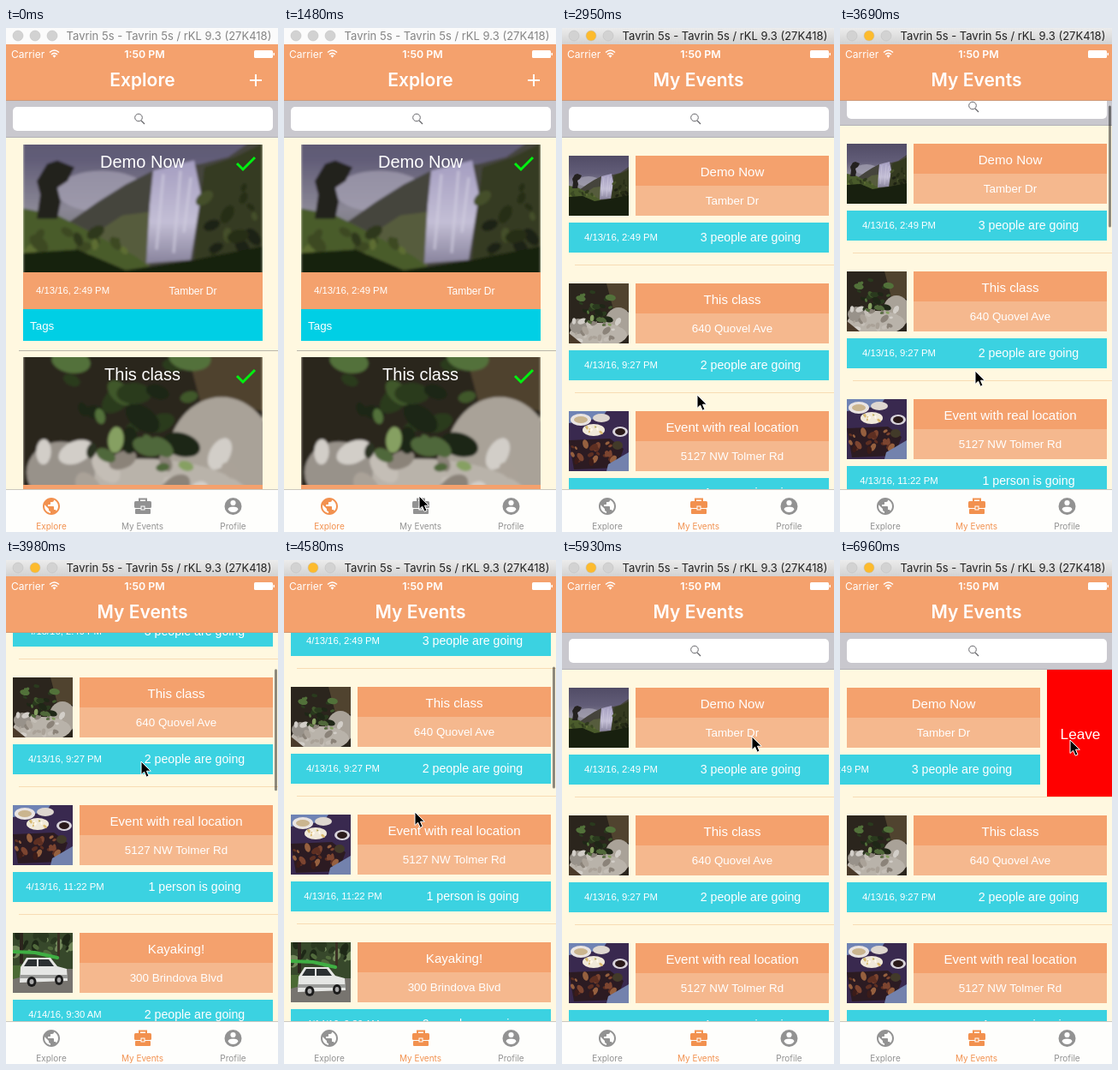
These frames come from a looping animation (318x588 px, 8 s). An HTML page:

```html
<!DOCTYPE html>
<html lang="en">
<head>
<meta charset="utf-8">
<title>Event list</title>
<style>
  html, body { margin: 0; width: 100%; height: 100%; overflow: hidden; background: #fff8e0; }
  svg { display: block; width: 100vw; height: 100vh; }
  text { font-family: "Liberation Sans", Arial, sans-serif; fill: #fff; white-space: pre; }
  .ui { font-family: Inter, "Open Sans", sans-serif; }
  .mid { text-anchor: middle; }
  .tab { color: #929292; }
  .tab.on { color: #f2914f; }
  .tab text { fill: currentColor; font-size: 10px; }
</style>
</head>
<body>
<svg id="stage" viewBox="0 0 318 588"></svg>
<script>
const LOOP = 8000;
const ORANGE = '#f4a16d', CREAM = '#fff8e0';

const rect = (x, y, w, h, fill, extra = '') =>
  `<rect x="${x}" y="${y}" width="${w}" height="${h}" fill="${fill}" ${extra}/>`;
const label = (x, y, size, str, cls = 'mid', extra = '') =>
  `<text x="${x}" y="${y}" font-size="${size}" class="${cls}" ${extra}>${str}</text>`;
const shape = (d, fill, extra = '') => `<path d="${d}" fill="${fill}" ${extra}/>`;
const line = (d, color, width, extra = '') =>
  shape(d, 'none', `stroke="${color}" stroke-width="${width}" ${extra}`);
const oval = (x, y, rx, ry, fill, extra = '') =>
  `<ellipse cx="${x}" cy="${y}" rx="${rx}" ry="${ry}" fill="${fill}" ${extra}/>`;
const group = (id, body, extra = '') => `<g id="${id}" ${extra}>${body}</g>`;
const gradient = (id, ...stops) =>
  `<linearGradient id="${id}" x2="0" y2="1">${stops.map(([o, c]) =>
    `<stop offset="${o}" stop-color="${c}"/>`).join('')}</linearGradient>`;

function randomizer(seed) {
  return () => (seed = seed * 16807 % 2147483647) / 2147483647;
}

// Scatter of soft blobs inside a box
function blobs(seed, count, [x, y, w, h], size, colors) {
  const rnd = randomizer(seed);
  return Array.from({ length: count }, () => {
    const cx = (x + rnd() * w).toFixed(1), cy = (y + rnd() * h).toFixed(1);
    const r = size * (0.5 + rnd());
    return oval(cx, cy, r.toFixed(1), (r * 0.6).toFixed(1), colors[Math.floor(rnd() * colors.length)],
      `transform="rotate(${Math.floor(rnd() * 180)} ${cx} ${cy})"`);
  }).join('');
}

// Pictures are painted on a 70 x 70 square
const pictures = {
  falls:
    rect(0, 0, 70, 70, 'url(#sky)') +
    oval(23, 30, 13, 6, '#a5a2b4', 'opacity=".7"') +
    shape('M12 40L22 33 30 28 38 24 52 22 60 20 70 13V58H12Z', '#45443c') +
    shape('M20 43L29 37 37 36 37 52H20Z', '#565c3d') +
    shape('M38 24L50 21 52 31 49 50 36 51 37 34Z', 'url(#water)') +
    line('M41 25L39 47M46 24L44 48M49 26L47 42', '#d3cfe2', 0.8, 'opacity=".6"') +
    shape('M53 23L62 20 70 16V58H49L51 40Z', '#343a20') +
    shape('M0 35L10 37 20 42 33 49 42 56H0Z', '#4a5b2b') +
    blobs(5, 16, [2, 40, 30, 12], 2.2, ['#5d6d33', '#3c4a24', '#2f391d']) +
    blobs(9, 14, [53, 28, 15, 22], 2.2, ['#45502a', '#262d16', '#1e2214']) +
    shape('M4 38L5 31 4 27 7 22 10 21 15 23 13 27 10 29 11 33 10 38Z', '#24211f') +
    shape('M0 48L16 47 30 53 50 50 70 46V70H0Z', '#18200f'),
  dish:
    rect(0, 0, 70, 70, '#2b251d') +
    shape('M44 0H70V32L52 30Z', '#50432f') +
    oval(58, 47, 16, 19, '#a9a298') +
    oval(34, 60, 34, 14, '#b9b3aa') +
    oval(11, 50, 10, 9, '#98928a') +
    blobs(31, 24, [6, 42, 58, 26], 4, ['#d2cec8', '#c4beb6', '#8b8379', '#aaa298']) +
    blobs(17, 20, [14, 10, 36, 32], 4.2, ['#40582c', '#6c8c4c', '#2a3a1e', '#52713a', '#1f2717']) +
    blobs(3, 9, [20, 40, 28, 9], 3, ['#50683a', '#2b3320', '#86a062']) +
    shape('M0 58L0 70 15 70Z', '#4a3a2a'),
  meal:
    rect(0, 0, 70, 70, '#39294f') +
    shape('M0 0H44L38 8 0 14Z', '#6f83b4') +
    oval(14, 10, 12, 7, '#e9e4e2') + oval(14, 10, 8, 4, '#cab58f') +
    oval(38, 8, 10, 5, '#ded7d0') +
    oval(60, 24, 9, 6, '#d9d4dc') + oval(60, 24, 6, 4, '#2a1a1a') +
    oval(29, 22, 13, 7, '#f0e9d9') + blobs(8, 10, [20, 18, 18, 8], 2, ['#d9b96f', '#fff8e8', '#8e9b4c']) +
    shape('M0 34L48 32 64 44 56 66 6 68Z', '#2c1b22') +
    blobs(12, 26, [4, 36, 48, 24], 4, ['#5e2f22', '#7d4530', '#3c1c19', '#96603f']) +
    oval(57, 40, 6, 5, '#423a29') + shape('M46 62L70 48V70H44Z', '#7382ad'),
  car:
    rect(0, 0, 70, 70, '#37482b') +
    blobs(21, 30, [0, 0, 70, 26], 5, ['#2a3820', '#516a3c', '#71875a', '#1e2817']) +
    rect(8, 0, 4, 36, '#2c251d') + rect(52, 0, 3, 28, '#3a3024') +
    rect(0, 42, 70, 28, '#77746f') +
    shape('M0 38H16V50L0 54Z', '#4b6a34') +
    line('M0 22L26 23 52 29', '#3fae43', 4, 'stroke-linecap="round"') +
    shape('M9 40L16 29H44L52 39 63 42 64 56 8 58Z', '#e5e6e4') +
    shape('M13 39L18 31H28V39ZM30 39V31H42L48 39Z', '#2b3032') +
    shape('M8 49H64V53H8Z', '#9b9c9a') +
    oval(22, 57, 5.5, 6, '#1b1b1b') + oval(54, 55, 5, 6, '#1b1b1b') +
    oval(22, 57, 2.5, 3, '#a8a8a8') + oval(54, 55, 2.3, 3, '#a8a8a8')
};
const picture = (name, x, y, w, h) =>
  `<svg x="${x}" y="${y}" width="${w}" height="${h}" viewBox="0 0 70 70" preserveAspectRatio="xMidYMid slice"><g filter="url(#soft)">${pictures[name]}</g></svg>`;

const events = [
  ['falls', 'Demo Now', 'Tamber Dr', '4/13/16, 2:49 PM', '3 people are going'],
  ['dish', 'This class', '640 Quovel Ave', '4/13/16, 9:27 PM', '2 people are going'],
  ['meal', 'Event with real location', '5127 NW Tolmer Rd', '4/13/16, 11:22 PM', '1 person is going'],
  ['car', 'Kayaking!', '300 Brindova Blvd', '4/14/16, 9:30 AM', '2 people are going']
];

const searchBar =
  rect(0, 85, 318, 43, '#c9c8ce') + rect(0, 127, 318, 1, '#b2b1b7') +
  rect(8, 92, 304, 28, '#fff', 'rx="5"') +
  '<circle cx="155" cy="104.500" r="4.300" fill="none" stroke="#66666b"/>' +
  line('M158 108L162 112', '#66666b', 1.3);

function eventRow([pic, title, place, date, going], i) {
  const y = 128 + 149 * i;
  const card =
    picture(pic, 8, y + 21, 70, 70) +
    rect(86, y + 21, 226, 35, ORANGE) + rect(86, y + 56, 226, 35, '#f5b88e') +
    rect(8, y + 99, 304, 35, '#3bd2e1') +
    label(199, y + 44.5, 15.1, title) + label(199, y + 78, 13.4, place) +
    label(69, y + 120, 11.3, date) + label(220.5, y + 121, 14.2, going);
  return rect(15, y + 148, 303, 1, '#f8dcb4') + group('card' + i, card);
}

function exploreCard([pic, title, place, date], y) {
  return picture(pic, 20, y, 280, 149) +
    rect(20, y + 149, 280, 43, ORANGE) + rect(20, y + 192, 280, 37, '#00cfe5') +
    label(159.5, y + 27, 20, title) +
    line(`M270 ${y + 22}L277 ${y + 29} 291 ${y + 15}`, '#00f010', 3) +
    label(35, y + 174, 11.3, date, '') + label(218.5, y + 175, 12, place) +
    label(28, y + 216, 13.4, 'Tags', '') + rect(15, y + 240, 303, 1, '#b9b6aa');
}

function spokes(inner, outer, width, color) {
  return Array.from({ length: 12 }, (_, i) =>
    line(`M0 ${-inner}V${-outer}`, color, width,
      `stroke-linecap="round" opacity="${(0.25 + 0.7 * ((i + 3) % 12) / 11).toFixed(2)}" transform="rotate(${i * 30})"`)).join('');
}

const loading =
  rect(105, 261, 110, 86, '#4c4a42', 'rx="9"') +
  `<g transform="translate(159.500 286.500)">${group('spin', spokes(9, 16, 3, '#fff'))}</g>` +
  label(160, 330, 13.4, 'Loading...') +
  `<g transform="translate(73.500 30)">${group('busy', spokes(2.5, 4.5, 1, '#fbe0cc'))}</g>`;

const header =
  rect(0, 19, 318, 65, ORANGE) + rect(0, 84, 318, 1, '#cf9a78') +
  label(6, 34.5, 12, 'Carrier', 'ui') + label(162, 34.5, 12.4, '1:50 PM', 'ui mid', 'font-weight="600"') +
  line('M51 28.500Q56.500 23.500 62 28.500M53 31Q56.500 27.800 60 31', '#fff', 1.5) +
  shape('M54.500 32.300Q56.500 30.600 58.500 32.300L56.500 34.700Z', '#fff') +
  rect(290, 26, 22, 9, '#fff', 'rx="1.500"') + rect(312.5, 29, 1.5, 3, '#fff') +
  label(159.5, 68, 21, '', 'ui mid', 'id="heading" font-weight="600"') +
  group('plus', line('M285 61H299M292 54V68', '#fff', 2));

const globe = 'M12 2C6.480 2 2 6.480 2 12s4.480 10 10 10 10-4.480 10-10S17.520 2 12 2zm-1 17.930c-3.950-.490-7-3.850-7-7.930 0-.620.080-1.210.210-1.790L9 15v1c0 1.100.900 2 2 2v1.930zm6.900-2.540c-.260-.810-1-1.390-1.900-1.390h-1v-3c0-.550-.450-1-1-1H8v-2h2c.550 0 1-.450 1-1V7h2c1.100 0 2-.900 2-2v-.410c2.930 1.190 5 4.060 5 7.410 0 2.080-.800 3.970-2.100 5.390z';
const tab = (id, x, icon, name) =>
  group(id, icon + label(x, 584.5, 10, name, 'ui mid'), 'class="tab"');
const tabBar =
  rect(0, 539, 318, 49, '#fefefc') + rect(0, 538, 318, 1, '#cbc8bf') +
  tab('tabExplore', 53, shape(globe, 'currentColor', 'transform="translate(41 546)"'), 'Explore') +
  tab('tabEvents', 159.5,
    rect(150, 552, 20, 8, 'currentColor', 'rx="1.500"') + rect(151, 561, 18, 6, 'currentColor', 'rx="1"') +
    line('M156 552V549.500H164V552', 'currentColor', 2) + rect(158, 558, 4, 4, 'currentColor', 'stroke="#fff"'),
    'My Events') +
  tab('tabProfile', 265.5,
    oval(265.5, 558, 10, 10, 'currentColor') + oval(265.5, 554, 3.1, 3.1, '#fff') +
    shape('M259.500 561.500Q260 558.800 265.500 558.600 271 558.800 271.500 561.500 269.500 565 265.500 565 261.500 565 259.500 561.500Z', '#fff'),
    'Profile');

const windowBar =
  rect(0, 0, 318, 19, '#fbfbfb', 'id="bar"') +
  [14, 34, 54].map((x, i) => oval(x, 9, 6, 6, '#d2d2d2', `id="dot${i}" stroke="#bdbdbd" stroke-width=".5"`)).join('') +
  label(190.5, 14, 13, 'Tavrin 5s - Tavrin 5s / rKL 9.3 (27K418)', 'ui mid', 'id="caption"');

document.getElementById('stage').innerHTML =
  '<defs>' +
  gradient('sky', [0, '#514c66'], [0.3, '#625d78'], [0.5, '#8a8795'], [1, '#39432c']) +
  gradient('water', [0, '#a49dc0'], [0.6, '#c3bed5'], [1, '#88839c']) +
  gradient('chrome', [0, '#ececec'], [1, '#d2d2d2']) +
  '<filter id="soft"><feGaussianBlur stdDeviation=".45"/></filter>' +
  '</defs>' +
  rect(0, 0, 318, 588, CREAM) +
  group('explore', searchBar + exploreCard(events[0], 136) + exploreCard(events[1], 384)) +
  group('list',
    group('leave', rect(0, 128, 90, 149, '#f00') + label(39, 209, 17.2, 'Leave')) +
    searchBar + events.map(eventRow).join('')) +
  rect(314, 87, 3, 142, '#000', 'id="thumb" rx="1.500" opacity=".45"') +
  header + tabBar + group('loading', loading) + windowBar +
  group('pointer', shape('M0 0V15.500L3.600 12.200 6.200 18.200 9 17 6.500 11.200H11.300Z', '#000', 'stroke="#fff" stroke-width="1"'));

// Each step: [start time, values...]; values hold until the next step
const pointerSteps = [
  [450, 305, 347], [600, 262, 395], [740, 218, 450], [890, 186, 500], [1040, 166, 525], [1190, 158, 536],
  [1480, 158, 546], [1630, 158, 562], [2800, 158, 500], [2950, 158, 428],
  [3690, 158, 400], [3840, 158, 318], [3980, 158, 235], [4130, 156, 238], [4280, 153, 262],
  [4580, 153, 294], [4730, 155, 340], [4880, 158, 388], [5030, 160, 420], [5180, 161, 426],
  [5330, 190, 318], [5480, 226, 206],
  [5930, 222, 206], [6080, 208, 206], [6230, 180, 206], [6370, 154, 206], [6520, 148, 206],
  [6670, 190, 208], [6820, 242, 210], [6960, 269, 210]
];
const scrollSteps = [
  [0, 0], [3690, 14], [3840, 88], [3980, 161], [4130, 175], [4280, 178],
  [4580, 150], [4730, 106], [4880, 56], [5030, 12], [5180, -5], [5330, -2], [5480, 0]
];
const swipeSteps = [[0, 0], [6080, 8], [6230, 34], [6370, 62], [6520, 74], [6670, 78]];

const at = (steps, t) => steps.findLast(step => step[0] <= t);
const el = id => document.getElementById(id);
const show = (id, on) => { el(id).style.display = on ? '' : 'none'; };
const move = (id, x, y) => el(id).setAttribute('transform', `translate(${x} ${y})`);
const paint = (id, color) => el(id).setAttribute('fill', color);

function render(t) {
  const active = t >= 1770, onEvents = t >= 2210, loaded = t >= 2500;
  paint('bar', active ? 'url(#chrome)' : '#fbfbfb');
  paint('dot1', active ? '#fdbb2d' : '#d2d2d2');
  el('caption').style.fill = active ? '#222' : '#858585';
  el('heading').textContent = onEvents ? 'My Events' : 'Explore';
  el('tabExplore').classList.toggle('on', !onEvents);
  el('tabEvents').classList.toggle('on', onEvents);
  show('explore', !onEvents);
  show('plus', !onEvents);
  show('loading', onEvents && !loaded);
  show('list', loaded);

  const turn = t < 2350 ? 0 : 60;
  for (const id of ['spin', 'busy']) el(id).setAttribute('transform', `rotate(${turn})`);

  const offset = at(scrollSteps, t)[1];
  move('list', 0, -offset);
  move('thumb', 0, Math.max(0, offset * 0.25));
  show('thumb', t >= 3690 && t < 5630);

  const swipe = at(swipeSteps, t)[1];
  move('card0', -swipe, 0);
  move('leave', 320 - swipe, 0);
  show('leave', swipe > 0);

  const pointer = at(pointerSteps, t);
  show('pointer', pointer);
  if (pointer) move('pointer', pointer[1], pointer[2]);
}

const start = performance.now();
function tick() {
  render((performance.now() - start) % LOOP);
  requestAnimationFrame(tick);
}
tick();
</script>
</body>
</html>
```
